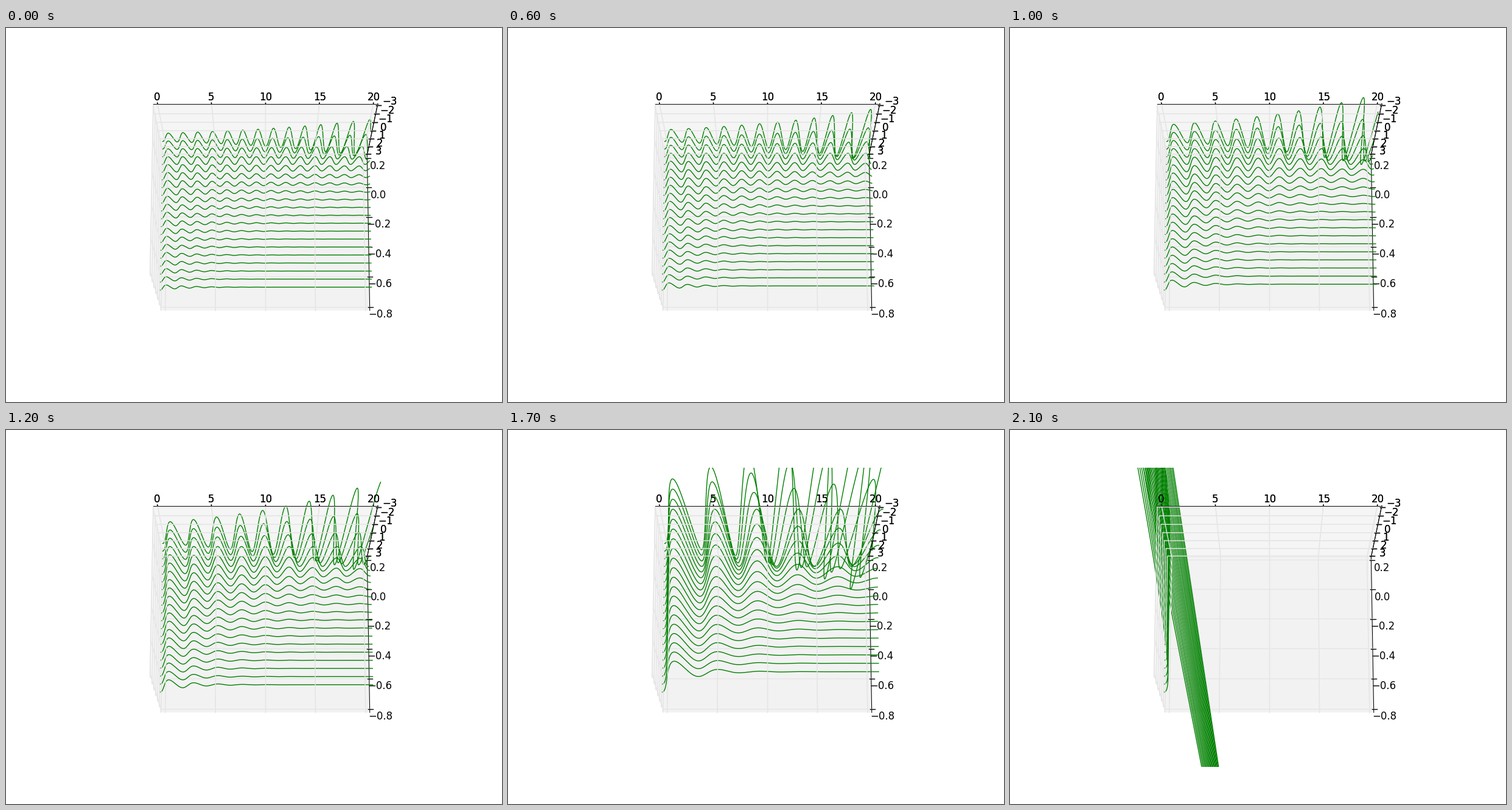
These frames come from a looping animation (815x615 px, 2200 ms). A matplotlib script:

```python
import numpy as np
import matplotlib.pyplot as plt
from matplotlib.animation import FuncAnimation
from matplotlib.patches import Polygon, Rectangle

W, H, DPI = 815, 615, 100
FRAMES, INTERVAL = 22, 100
LO, HI = -0.5 - 1 / 48, 0.5 + 1 / 48   # padded edges of the unit cube
TICK, PAD = 1 / 12, 0.0565             # tick unit and label offset

# Viewport, and camera ten units away, 15 degrees below the horizon
LEFT, TOP, VW, VH = 0.125 * W, 0.1 * H, 0.775 * W, 0.8 * H
CX, CY = LEFT + VW * 95 / 185, TOP + VH * 90 / 185
SIN, COS = np.sin(np.radians(-15)), np.cos(np.radians(-15))


def screen(a, b, c):
    """Project centred unit-cube coordinates to stage pixels."""
    depth = 10 + COS * b - SIN * c
    up = SIN * b + COS * c
    return CX + VW / 0.185 * a / depth, CY - VH / 0.185 * up / depth


def solve(stiff, mu, end=20.0, dt=0.01):
    """One-sided spring under constant load, integrated with RK4."""
    def rate(s):
        y, v = s
        return np.array([v, mu * v - np.where(y < 0, stiff, 13.0) * y - 10])

    n = int(round(end / dt))
    s = np.zeros((2,) + np.broadcast(stiff, mu).shape)
    out = [s[0]]
    for _ in range(n):
        k1 = rate(s)
        k2 = rate(s + dt / 2 * k1)
        k3 = rate(s + dt / 2 * k2)
        k4 = rate(s + dt * k3)
        s = s + dt / 6 * (k1 + 2 * k2 + 2 * k3 + k4)
        out.append(s[0])
    return np.linspace(0, end, n + 1), np.array(out)


fig = plt.figure(figsize=(W / DPI, H / DPI), dpi=DPI, facecolor="white")
ax = fig.add_axes([0, 0, 1, 1])
ax.set_xlim(0, W)
ax.set_ylim(H, 0)
ax.axis("off")


def stroke(points, z, color, lw):
    xs, ys = zip(*(screen(*p) for p in points))
    ax.plot(xs, ys, color=color, lw=lw, zorder=z)


def pane(corners, shade):
    ax.add_patch(Polygon([screen(*p) for p in corners], closed=False, alpha=0.5,
                         fc=(shade,) * 3, ec=(shade,) * 3, lw=1, zorder=0))


def draw_axis(z, line, ticks, grid, mark, spot):
    stroke(line, z, "black", 0.75)
    for u, _ in ticks:
        stroke(grid(u), z, (0.9, 0.9, 0.9), 1)
    for u, text in ticks:
        stroke(mark(u), z, "black", 1)
        x, y = screen(*spot(u))
        ax.text(x, y, text, ha="center", va="top", fontsize=12,
                family="DejaVu Sans", color="black", zorder=z)


def label(v, fmt):
    return format(v, fmt).replace("-", "\u2212")


x_axis = dict(
    line=[(LO, LO, HI), (HI, LO, HI)],
    ticks=[(v / 20 - 0.5, label(v, "d")) for v in range(0, 21, 5)],
    grid=lambda u: [(u, LO, HI), (u, HI, HI), (u, HI, LO)],
    mark=lambda u: [(u, LO + 0.1 * TICK, HI), (u, LO - 0.2 * TICK, HI)],
    spot=lambda u: (u, LO - PAD, HI + PAD))
y_axis = dict(
    line=[(HI, LO, HI), (HI, HI, HI)],
    ticks=[(v / 6, label(v, "d")) for v in range(-3, 4)],
    grid=lambda u: [(HI, u, HI), (LO, u, HI), (LO, u, LO)],
    mark=lambda u: [(HI - 0.1 * TICK, u, HI), (HI + 0.2 * TICK, u, HI)],
    spot=lambda u: (HI + PAD, u, HI + PAD))
z_axis = dict(
    line=[(HI, HI, HI), (HI, HI, LO)],
    ticks=[(v / 10 + 0.3, label(v / 10, ".1f")) for v in range(-8, 3, 2)],
    grid=lambda u: [(LO, LO, u), (LO, HI, u), (HI, HI, u)],
    mark=lambda u: [(HI - 0.1 * TICK, HI, u), (HI + 0.2 * TICK, HI, u)],
    spot=lambda u: (HI + PAD, HI + PAD, u))

pane([(LO, LO, LO), (LO, LO, HI), (LO, HI, HI), (LO, HI, LO)], 0.95)
pane([(LO, HI, LO), (LO, HI, HI), (HI, HI, HI), (HI, HI, LO)], 0.9)
pane([(LO, LO, HI), (LO, HI, HI), (HI, HI, HI), (HI, LO, HI)], 0.925)

# The x and y axes are painted both below and above the curves
for axis in (x_axis, y_axis, z_axis):
    draw_axis(1, **axis)
for axis in (x_axis, y_axis):
    draw_axis(3, **axis)

mu = -0.8 + 0.05 * np.arange(20)
stiffness = 20.0 - np.arange(FRAMES)
t, y = solve(stiffness[:, None], mu[None, :])

window = Rectangle((LEFT, TOP), VW, VH, transform=ax.transData)
curves = []
for _ in mu:
    curve, = ax.plot([], [], color=(0, 0.5, 0), lw=1, zorder=2)
    curve.set_clip_path(window)
    curves.append(curve)


def update(i):
    for j, curve in enumerate(curves):
        curve.set_data(*screen(t / 20 - 0.5, y[:, i, j] / 6, mu[j] + 0.3))
    return curves


anim = FuncAnimation(fig, update, frames=FRAMES, interval=INTERVAL,
                     init_func=lambda: update(0), repeat=True, repeat_delay=0)
plt.show()
```
